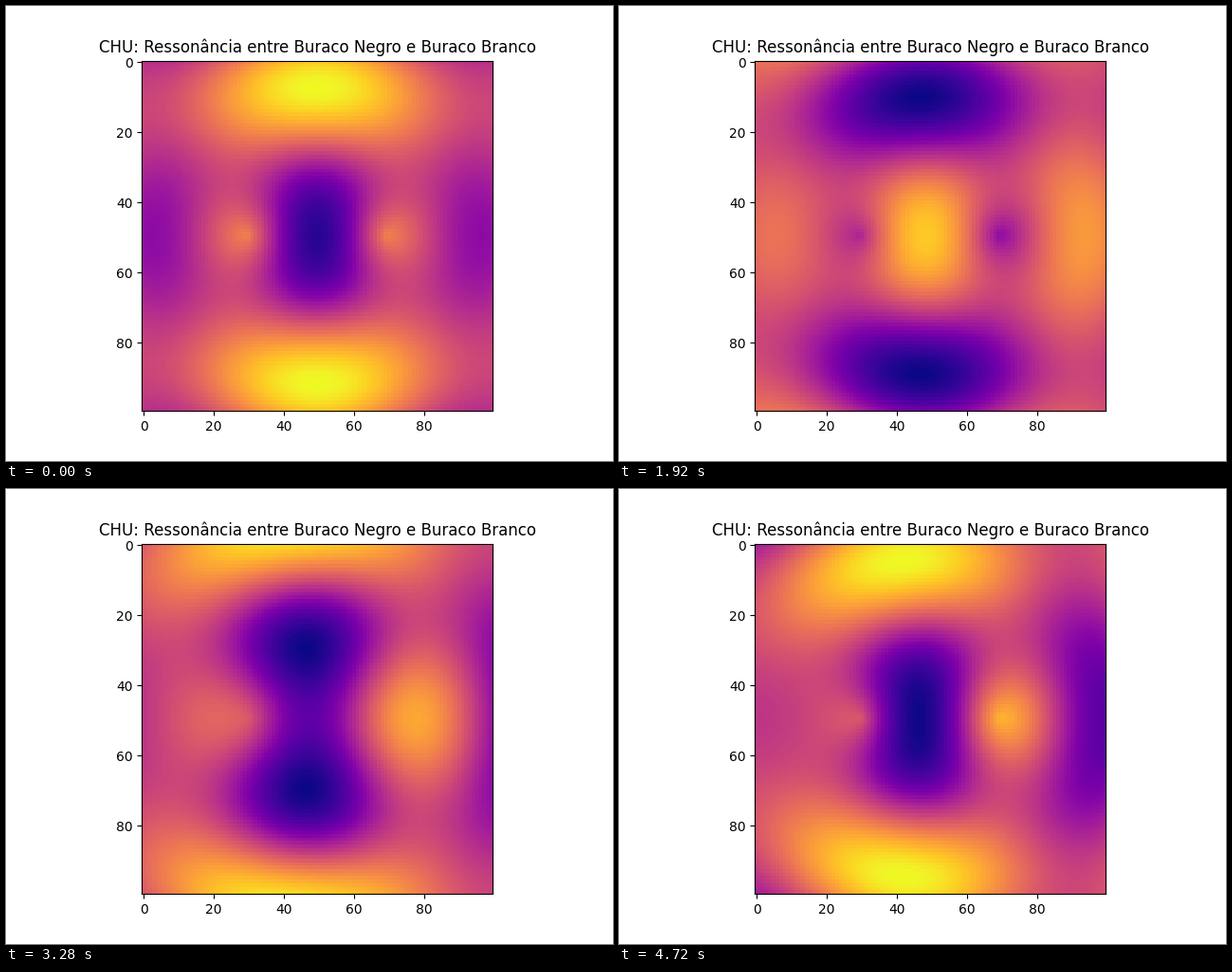
Recreate the animation shown at these times as a matplotlib script. Size 640 px wide and 480 px high, loop 4.8 s.

```python
import numpy as np
import matplotlib.pyplot as plt
from matplotlib.animation import FuncAnimation

FRAMES = 60
INTERVAL = 80
SIZE = 100
BLACK_CYCLES = 6.0
WHITE_CYCLES = 6.1

axis = np.linspace(-5, 5, SIZE)
X, Y = np.meshgrid(axis, axis)
r_black = np.hypot(X + 2, Y)
r_white = np.hypot(X - 2, Y)


def field(frame):
    """Sum of two outgoing waves with slightly different frequencies."""
    angle = 2 * np.pi * frame / (FRAMES - 1)
    return (np.sin(BLACK_CYCLES * angle - r_black)
            + np.sin(WHITE_CYCLES * angle - r_white))


fig, ax = plt.subplots(figsize=(6.4, 4.8), dpi=100)
image = ax.imshow(field(0), cmap="plasma", vmin=-2, vmax=2)
ax.set_title("CHU: Ressonância entre Buraco Negro e Buraco Branco")


def update(frame):
    image.set_data(field(frame))
    return [image]


anim = FuncAnimation(fig, update, frames=FRAMES, interval=INTERVAL,
                     repeat=True, repeat_delay=0)
plt.show()
```
